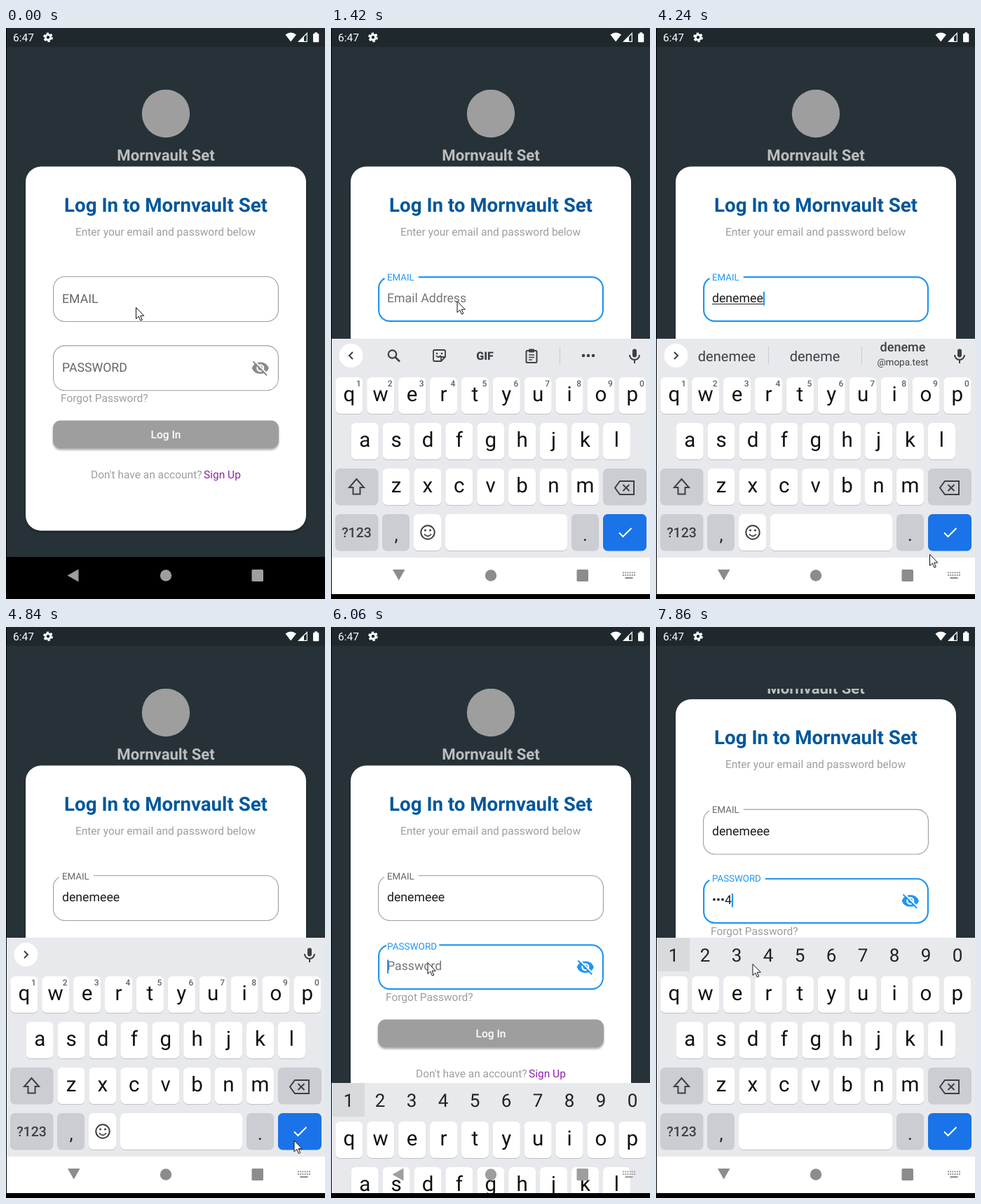
Animation of 455 by 814 pixels, one loop 8 s. Source, as an HTML page:

```html
<!DOCTYPE html>
<html lang="en">
<head>
<meta charset="utf-8">
<title>Log in</title>
<style>
  html, body { margin: 0; height: 100%; overflow: hidden; background: #000; }
  svg { display: block; width: 100vw; height: 100vh; font-family: Roboto, sans-serif; text-rendering: geometricPrecision; }
</style>
</head>
<body>
<svg id="stage" viewBox="0 0 455 814"></svg>
<script>
const LOOP = 8000;
const BRAND = 'Mornvault Set';
const GREY = '#9e9e9e', BLUE = '#2196f3', DARK = '#3c4043';
const TOP = 443, HIDDEN = 807, PITCH = 44.9;

// Each step changes only what it names; the rest carries over.
const steps = [
  [0, { mouse: [185.5, 398.5], kb: HIDDEN, scroll: 0, focus: '', caret: false, email: '', pass: '',
        emailUp: 0, passUp: 0, digits: false, pressed: false, nav: GREY }],
  [400, { mouse: [183, 394] }],
  [600, { mouse: [181, 391] }],
  [800, { mouse: [180, 389.5] }],
  [1000, { focus: 'email', emailUp: .94, caret: true, kb: 650 }],
  [1220, { emailUp: 1, kb: TOP }],
  [1420, { caret: false }],
  [1620, { mouse: null }],
  [2020, { caret: true }],
  [2420, { caret: false }],
  [2820, { caret: true, email: 'd' }],
  [3020, { email: 'de' }],
  [3240, { email: 'den' }],
  [3440, { email: 'dene' }],
  [3840, { email: 'denem' }],
  [4040, { email: 'deneme', mouse: [395, 767] }],
  [4240, { email: 'denemee', mouse: [390.5, 750.5] }],
  [4440, { email: 'denemeee', mouse: [402, 738] }],
  [4640, { mouse: [411, 732], pressed: true }],
  [4840, { pressed: false, focus: '', caret: false }],
  [5040, { kb: 779, nav: '#ccc' }],
  [5240, { kb: HIDDEN, nav: GREY, mouse: [352, 672] }],
  [5440, { mouse: [230, 560] }],
  [5640, { mouse: [150, 490] }],
  [5840, { mouse: [138, 478.5] }],
  [6060, { focus: 'pass', passUp: .94, caret: true, kb: 650, digits: true }],
  [6260, { passUp: 1, kb: TOP, scroll: 45 }],
  [6460, { scroll: 92, caret: false, mouse: [138, 480.5] }],
  [6860, { scroll: 94.4, caret: true }],
  [7060, { pass: '1' }],
  [7260, { pass: '•2' }],
  [7460, { pass: '••3' }],
  [7860, { pass: '•••4' }]
];

const pen = document.createElement('canvas').getContext('2d');
const widthOf = (str, size) => {
  pen.font = '100px Roboto, sans-serif';
  return pen.measureText(str).width * size / 100;
};

const rect = (x, y, w, h, fill, r = 0, more = '') =>
  `<rect x="${x}" y="${y}" width="${w}" height="${h}" rx="${r}" fill="${fill}" ${more}/>`;
const dot = (x, y, r, fill, more = '') => `<circle cx="${x}" cy="${y}" r="${r}" fill="${fill}" ${more}/>`;
const shape = (d, fill, more = '') => `<path d="${d}" fill="${fill}" ${more}/>`;
const line = (d, color, w = 2) => shape(d, 'none', `stroke="${color}" stroke-width="${w}"`);
const text = (str, x, y, size, fill, more = '') =>
  `<text x="${x}" y="${y}" font-size="${size}" fill="${fill}" ${more}>${str}</text>`;
const mid = (str, x, y, size, fill, weight = 400) =>
  text(str, x, y, size, fill, `text-anchor="middle" font-weight="${weight}"`);
const move = (x, y, body) => `<g transform="translate(${x} ${y})">${body}</g>`;

// The outline grows inwards, so its outer edge stays put.
function field(y, label, hint, value, up, focused, caret) {
  const color = focused ? BLUE : '#666', size = 17.7 - 4.4 * up;
  const stroke = focused ? 2.2 : 1.1, half = stroke / 2;
  const inset = (1 - up) * 50, valueWidth = widthOf(value, 17.7);
  let out = rect(67 + half, y - .5 + half, 322 - stroke, 65 - stroke, '#fff', 17 - half,
    `stroke="${focused ? BLUE : GREY}" stroke-width="${stroke}"`);
  if (up) out += rect(76 + inset, y - 2, widthOf(label, size) + 10 - 2 * inset, 5, '#fff');
  out += text(label, 80, y + 37.5 - 32.5 * up, size, color);
  if (value) {
    out += text(value, 80, y + 36.5, 17.7, '#1c1c1c');
    if (focused && label === 'EMAIL') out += rect(80, y + 38.5, valueWidth, 1, '#1c1c1c');
  } else if (up) out += text(hint, 80, y + 36.5, 17.7, '#757575');
  if (caret) out += rect(80 + valueWidth, y + 21.5, 2.2, 19.5, BLUE);
  return out;
}

function eyeOff(color) {
  return `<g transform="translate(349.5 471.5) scale(1.107)">` +
    shape('M1 12A11.8 11.8 0 0 1 23 12A11.8 11.8 0 0 1 1 12Z', color) +
    dot(12, 12, 5, '#fff') + dot(12, 12, 3, color) +
    line('M4 2.4L22 20.4', '#fff', 1.8) + line('M2.6 3.6L20.4 21.4', color, 1.8) + '</g>';
}

function page(s) {
  const on = name => s.focus === name;
  return dot(228, 122, 34.2, GREY) +
    mid(BRAND, 228, 189, 22.1, '#bdbdbd', 700) +
    rect(28, 197.5, 400, 519, '#fff', 22, 'filter="url(#shade)"') +
    mid('Log In to ' + BRAND, 228, 261.5, 27.7, '#01579b', 700) +
    mid('Enter your email and password below', 227.5, 295.5, 15.5, GREY) +
    field(354.5, 'EMAIL', 'Email Address', s.email, s.emailUp, on('email'), on('email') && s.caret) +
    field(452.8, 'PASSWORD', 'Password', s.pass, s.passUp, on('pass'), on('pass') && s.caret) +
    eyeOff(on('pass') ? BLUE : '#8a8a8a') +
    text('Forgot Password?', 78, 533, 15.5, GREY) +
    rect(67, 559.5, 322, 40, GREY, 11, 'filter="url(#shade)"') +
    mid('Log In', 228, 585, 15.5, '#fff', 500) +
    text("Don't have an account?", 121, 642, 15.5, GREY) +
    text('Sign Up', 282, 642, 15.5, '#8e24aa');
}

function statusBar() {
  return rect(1, 0, 454, 27, '#1e282d') + text('6:47', 10, 19, 15.5, '#fff') +
    dot(60, 13.3, 3.7, 'none', 'stroke="#fff" stroke-width="3"') +
    dot(60, 13.3, 5.8, 'none', 'stroke="#fff" stroke-width="2.2" stroke-dasharray="3.3 2.77"') +
    shape('M398.5 9.5Q406.2 3.5 414 9.5L406.2 19.5Z', '#fff') +
    line('M417.5 19.3H429.3V7.5Z', '#fff', 1.2) + shape('M417 19.5H425V11.5Z', '#fff') +
    rect(438, 8, 8.3, 12.2, '#fff', 1) + rect(440.2, 6.3, 4, 2, '#fff');
}

const mic = () => rect(430, 457.5, 6, 12, DARK, 3) + line('M426 466A7 7 0 0 0 440 466M433 473V478', DARK);
const handle = d => dot(28.5, 467, 17, '#fff') + line(d, DARK);
const divider = x => rect(x, 454, 1, 26, '#c9cbd0');

function tools() {
  return handle('M31 462L26 467L31 472') +
    dot(87.5, 465, 5.7, 'none', `stroke="${DARK}" stroke-width="2.2"`) + line('M91.5 469L98 475.5', DARK, 2.5) +
    line('M148 459H161A2 2 0 0 1 163 461V469L157 475H148A2 2 0 0 1 146 473V461A2 2 0 0 1 148 459ZM157 475V469H163M150 467Q153 471 157 467', DARK, 1.8) +
    dot(151, 464, 1.3, DARK) + dot(158, 464, 1.3, DARK) +
    mid('GIF', 219.5, 472.5, 16, DARK, 900) +
    rect(278.5, 460, 15, 17, 'none', 1.5, `stroke="${DARK}" stroke-width="2"`) + rect(282, 457.5, 8, 5, DARK, 1) +
    line('M282 466H290M282 469.5H290M282 473H287', DARK, 1.5) +
    divider(326) + [360, 367, 374].map(x => dot(x, 467, 2.3, DARK)).join('') + mic();
}

function suggestions(s) {
  let out = handle('M26 462L31 467L26 472') + mic();
  if (s.focus) out += mid(s.email, 101, 474.5, 20, DARK) + divider(160) +
    mid('deneme', 226.5, 474.5, 20, DARK) + divider(293) +
    mid(s.email.slice(0, 6), 352, 461, 18, DARK, 500) + mid('@mopa.test', 352, 480.5, 13.5, DARK);
  return out;
}

const key = (x, y, w = 39) => rect(x, y + 1, w, 52, '#bfc1c7', 6.5) + rect(x, y, w, 52, '#fff', 6.5);
const flatKey = (x, y, w, fill = '#cccdd3') => rect(x, y, w, 52.5, fill, 6.5);

function letters(row, x, y) {
  return [...row].map((c, i) =>
    key(x + i * PITCH, y) + mid(c, x + 19.5 + i * PITCH, y + 34, 29.5, '#111')).join('');
}

function keyboard(s) {
  let out = rect(1, TOP, 454, 371, '#e8e9ed');
  const digits = [...'1234567890'];
  if (s.digits) {
    out += rect(2, TOP, 46, 48, '#d9dade') + digits.map((d, i) => mid(d, 25 + i * 45, 477, 26, '#222')).join('');
  } else {
    if (s.kb > TOP && s.email) out += rect(413, TOP + 1, 40, 47, '#d5d6da');
    out += s.email ? suggestions(s) : tools();
  }
  out += letters('qwertyuiop', 6.3, 498) + letters('asdfghjkl', 28.7, 563) + letters('zxcvbnm', 73.5, 628);
  if (!s.digits) out += digits.map((d, i) => mid(d, 39.3 + i * PITCH, 511, 12, '#5f6368', 500)).join('');
  out += flatKey(6, 628, 61.5) + line('M36.5 643L26 655H31.5V664.5H41.5V655H47Z', DARK) +
    flatKey(388, 628, 62) + line('M412 646H432V665H412L405 655.5ZM416.5 651L425.5 660M425.5 651L416.5 660', DARK) +
    flatKey(6, 693, 61.5) + mid('?123', 36.5, 726, 19.5, DARK, 500) +
    flatKey(73, 693, 39) + mid(',', 93, 731, 26, '#222') +
    flatKey(343, 693, 39) + mid('.', 362.5, 731, 26, '#222') +
    flatKey(388, 693, 62, s.pressed ? '#1557b0' : '#1a73e8') + line('M411 719.5L416.5 725L428.5 713', '#fff');
  if (s.digits) out += key(118, 693, 219);
  else out += key(118, 693) + key(163, 693, 174) +
    dot(138, 719, 9.7, 'none', `stroke="${DARK}" stroke-width="2"`) +
    dot(134.5, 716, 1.5, DARK) + dot(141.5, 716, 1.5, DARK) + line('M133 721.5Q138 727.5 143 721.5', DARK, 1.8);
  return out + rect(1, 755, 454, 59, '#fff');
}

function navBar(s) {
  const open = s.kb === TOP, fill = open ? '#8c8c8c' : s.nav;
  let out = shape(open ? 'M88 772H105.5L96.7 787.5Z' : 'M87.5 780.5L103.5 771.5V789.5Z', fill) +
    dot(228, 780.5, 8.2, fill) + rect(350.5, 772, 16.5, 17, fill, 1.5);
  if (s.kb < 700) {
    for (let i = 0; i < 12; i++) out += rect(416 + i % 6 * 3.2, 775.5 + (i / 6 | 0) * 3.5, 1.9, 1.9, fill);
    out += rect(419.5, 783, 11, 2, fill);
  }
  return out;
}

const defs = `<defs>
  <clipPath id="view"><rect x="1" y="88" width="454" height="666"/></clipPath>
  <clipPath id="glass"><rect x="1" y="0" width="454" height="807"/></clipPath>
  <filter id="shade" x="-5%" y="-10%" width="110%" height="130%">
    <feDropShadow dx="0" dy="2" stdDeviation="1.8" flood-opacity=".35"/>
  </filter></defs>`;

function scene(s) {
  let out = defs + rect(0, 0, 455, 814, '#000') + rect(1, 0, 454, 754, '#263238') + statusBar() +
    `<g clip-path="url(#view)">${move(0, -s.scroll, page(s))}</g>`;
  if (s.kb < HIDDEN) out += `<g clip-path="url(#glass)">${move(0, s.kb - TOP, keyboard(s))}</g>`;
  out += navBar(s);
  if (s.mouse) out += move(...s.mouse,
    shape('M0 0V16L3.8 12.6L6.4 18.6L8.8 17.6L6.2 11.7H11.3Z', '#fff', 'stroke="#111" stroke-width="1"'));
  return out;
}

const stage = document.getElementById('stage');
let shown = -1;

function tick(now) {
  const t = now % LOOP;
  const count = steps.filter(([start]) => start <= t).length;
  if (count !== shown) {
    shown = count;
    stage.innerHTML = scene(Object.assign({}, ...steps.slice(0, count).map(step => step[1])));
  }
  requestAnimationFrame(tick);
}
tick(0);
</script>
</body>
</html>
```
